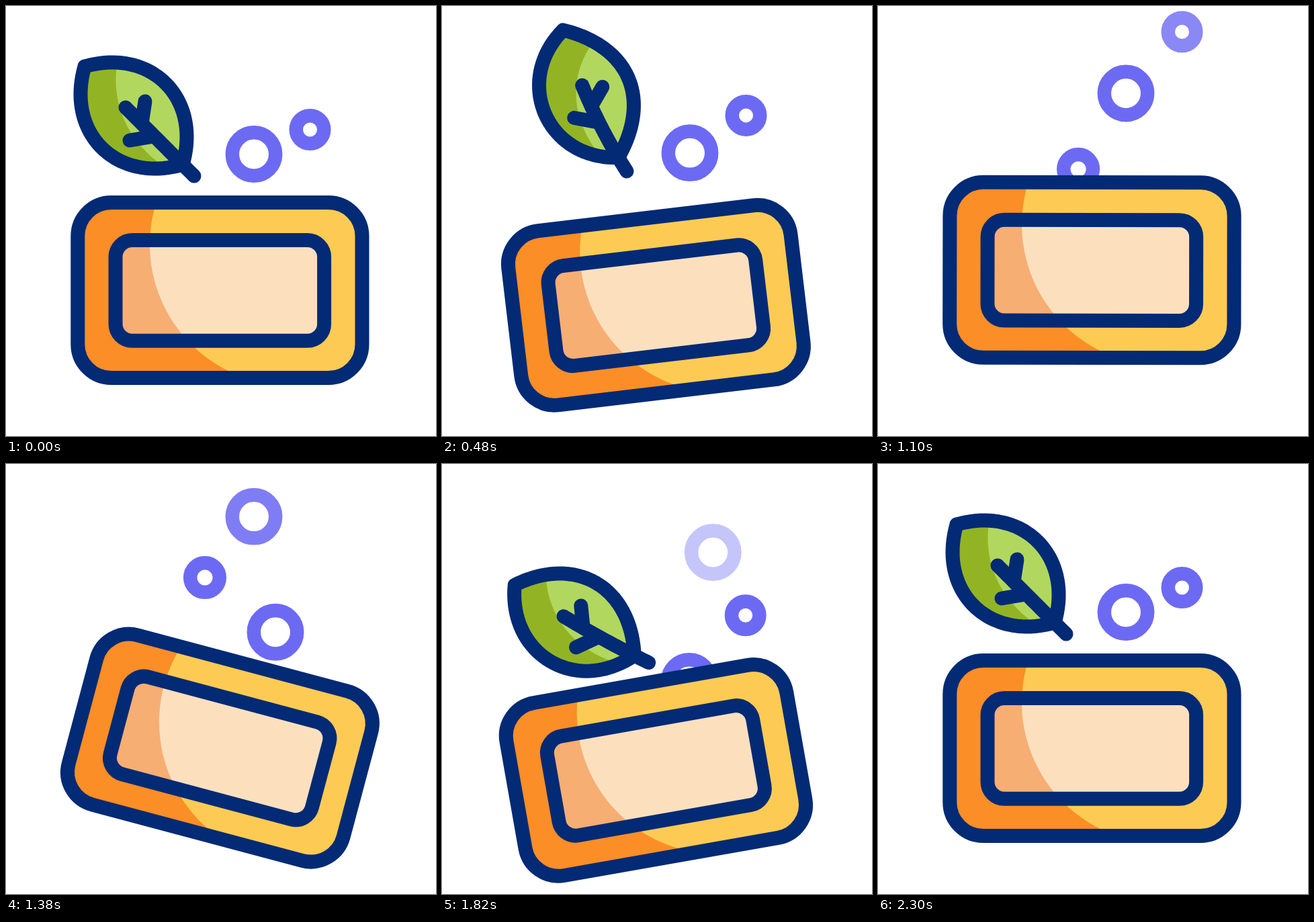
An HTML page with a canvas for the animation above (2.4 s loop, 640x640 px).

```html
<!DOCTYPE html>
<html lang="en">
<head>
<meta charset="utf-8">
<title>Soap and leaf</title>
<style>
  html, body { margin: 0; width: 100%; height: 100%; overflow: hidden; background: #fff; }
  canvas { display: block; width: 640px; height: 640px; }
</style>
</head>
<body>
<canvas id="stage" width="640" height="640"></canvas>
<script>
const ctx = document.getElementById('stage').getContext('2d');
const LOOP = 2400, FADE = 350;
const NAVY = '#032a75', PURPLE = '#6c6af3';
const LINE = 21, RING = 20.5;

const clamp = v => Math.min(1, Math.max(0, v));
const rad = deg => deg * Math.PI / 180;
const mix = (a, b, p) => a + (b - a) * p;
const linear = p => p;
const swing = p => (1 - Math.cos(Math.PI * p)) / 2;

// Swings from one resting value to the next: [time, value], ...
const between = (...stops) => t => {
  let value = stops[0][1];
  for (let i = 1; i < stops.length; i++) {
    const [t0] = stops[i - 1], [t1, v1] = stops[i];
    value = mix(value, v1, swing(clamp((t - t0) / (t1 - t0))));
  }
  return value;
};

const soap = {
  drop: between([200, 0], [712, 38.7], [1100, -30], [1710, 37.5], [2200, 0]),
  turn: between([200, 0], [800, -15], [1400, 15], [1815, -10], [2170, 0])
};

// Stem end, turn in degrees, bend in degrees per pixel.
const leaf = {
  x: between([180, 280], [480, 275], [670, 275], [1080, 339], [1640, 339], [2000, 277], [2300, 280]),
  y: between([180, 253], [480, 246], [1020, 405], [1486, 405], [2000, 255], [2300, 253]),
  turn: between([180, 0], [480, 12.4], [1150, -45], [1640, -45], [2000, 6.3], [2300, 0]),
  bend: between([180, 0], [480, 0.072], [780, 0], [1640, 0], [2000, 0.072], [2300, 0])
};

const BIG = 32.2, SMALL = 20.75;
const bubbles = [
  { r: BIG, x: [369, 369], y: [220.5, 42], time: [390, 1800], fade: 1335, waits: true },
  { r: SMALL, x: [452.5, 452.5], y: [184, -16], time: [184, 1594], fade: 1030, waits: true },
  { r: 21.8, x: [302, 293], y: [380, 64], time: [580, 1780], fade: 1430, ease: linear },
  { r: BIG, x: [399, 404], y: [353, 94], time: [1000, 1960], fade: 1607, ease: linear },
  { r: SMALL, x: [449, 452.5], y: [364, 184], time: [1213, 2104] },
  { r: BIG, x: [367.5, 369], y: [368, 220.5], time: [1551, 2280] }
];

function cubic(a, b, c, d, steps = 40) {
  return Array.from({ length: steps + 1 }, (_, i) => {
    const t = i / steps, u = 1 - t;
    return [0, 1].map(k => u * u * u * a[k] + 3 * u * u * t * b[k] + 3 * u * t * t * c[k] + t * t * t * d[k]);
  });
}

const mirror = ([x, y]) => [y + 27, x - 27];
const side = [[117, 90], [216, 61.7], [291.3, 137], [263, 236]];
const outline = [...cubic(...side), ...cubic(...side.map(mirror)).reverse()];
const lightSide = [...cubic([165, 88], [158, 140], [175, 195], [232, 237]), [300, 237], [300, 60], [165, 60]];
const veins = [
  cubic([178, 151], [212, 185], [246, 219], [280, 253]),
  [[207, 142], [202, 175]],
  [[184, 200], [220, 194]]
];

// Carries a resting leaf point onto the turned and curved leaf.
function bender(t) {
  const x0 = leaf.x(t), y0 = leaf.y(t), turn = leaf.turn(t), bend = leaf.bend(t);
  return ([x, y]) => {
    const dx = x - 280, dy = y - 253;
    const s = -(dx + dy) * Math.SQRT1_2, v = (dx - dy) * Math.SQRT1_2;
    const chord = rad(225 + turn + bend * s / 2), normal = rad(315 + turn + bend * s);
    return [x0 + s * Math.cos(chord) + v * Math.cos(normal), y0 + s * Math.sin(chord) + v * Math.sin(normal)];
  };
}

function trace(points, closed) {
  ctx.beginPath();
  points.forEach(p => ctx.lineTo(...p));
  if (closed) ctx.closePath();
}

function drawLeaf(t) {
  const bend = bender(t);
  const edge = outline.map(bend);
  ctx.save();
  trace(edge, true);
  ctx.fillStyle = '#92b424';
  ctx.fill();
  ctx.clip();
  trace(lightSide.map(bend), true);
  ctx.fillStyle = '#b2d75e';
  ctx.fill();
  ctx.restore();
  ctx.strokeStyle = NAVY;
  ctx.lineWidth = LINE;
  trace(edge, true);
  ctx.stroke();
  for (const vein of veins) {
    trace(vein.map(bend));
    ctx.stroke();
  }
}

function drawBubble({ r, x, y, time, fade = LOOP, ease = swing, waits }, t) {
  if (t < time[0] && !waits) return;
  const p = ease(clamp((t - time[0]) / (time[1] - time[0])));
  ctx.globalAlpha = 1 - clamp((t - fade) / FADE);
  ctx.strokeStyle = PURPLE;
  ctx.lineWidth = RING;
  ctx.beginPath();
  ctx.arc(mix(...x, p), mix(...y, p), r, 0, 7);
  ctx.stroke();
  ctx.globalAlpha = 1;
}

// A framed block, dark outside the large light circle.
function drawBlock(x, y, w, h, r, dark, light) {
  ctx.save();
  ctx.beginPath();
  ctx.roundRect(x, y, w, h, r);
  ctx.fillStyle = dark;
  ctx.fill();
  ctx.clip();
  ctx.beginPath();
  ctx.arc(424, 355, 210, 0, 7);
  ctx.rect(424, 200, 200, 400);
  ctx.fillStyle = light;
  ctx.fill();
  ctx.restore();
  ctx.beginPath();
  ctx.roundRect(x, y, w, h, r);
  ctx.strokeStyle = NAVY;
  ctx.lineWidth = LINE;
  ctx.stroke();
}

function drawSoap(t) {
  ctx.save();
  ctx.translate(318.4, 423 + soap.drop(t));
  ctx.rotate(rad(soap.turn(t)));
  ctx.translate(-318.4, -423);
  drawBlock(106.8, 292.5, 423.2, 261, 50, '#fb8e26', '#fdcb53');
  drawBlock(163, 348.5, 310.6, 149.8, 25, '#f6ae73', '#fce0be');
  ctx.restore();
}

function draw(now) {
  const t = now % LOOP;
  ctx.fillStyle = '#fff';
  ctx.fillRect(0, 0, 640, 640);
  bubbles.forEach(b => drawBubble(b, t));
  drawLeaf(t);
  drawSoap(t);
}

ctx.lineCap = ctx.lineJoin = 'round';
const start = performance.now();
function tick() {
  draw(performance.now() - start);
  requestAnimationFrame(tick);
}
tick();
</script>
</body>
</html>
```
